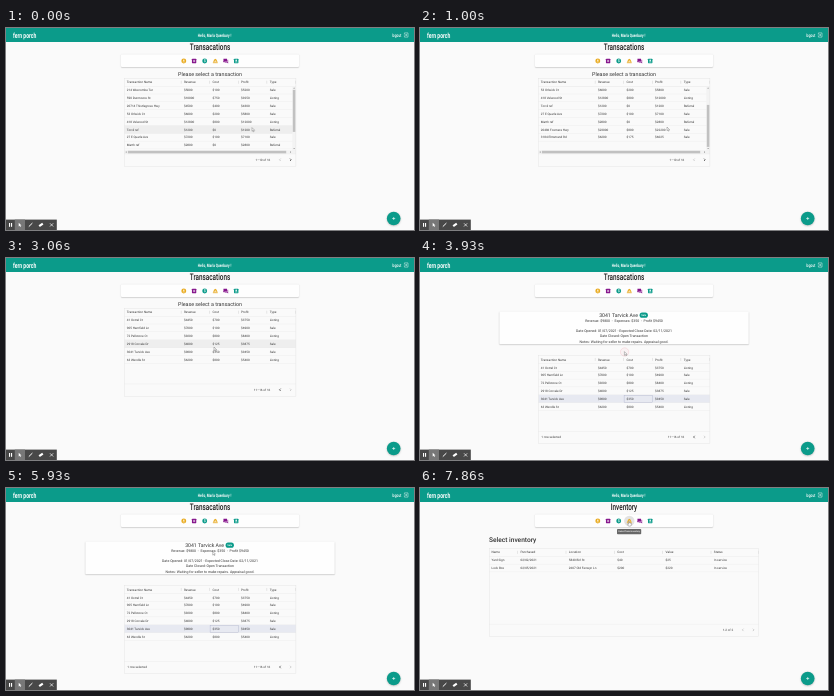
These frames come from a looping animation (408x202 px, 8 s). An HTML page with a canvas:

```html
<!DOCTYPE html>
<html lang="en">
<head>
<meta charset="utf-8">
<title>Transactions dashboard</title>
<style>
html, body { margin: 0; width: 100%; height: 100%; overflow: hidden; background: #fafafa; }
canvas { display: block; width: 408px; height: 202px; }
</style>
</head>
<body>
<canvas id="stage"></canvas>
<script>
const W = 408, H = 202, LOOP = 8000;
const canvas = document.getElementById('stage');
const ctx = canvas.getContext('2d');
const dpr = window.devicePixelRatio || 1;
canvas.width = W * dpr;
canvas.height = H * dpr;

const TEAL = '#0b9b8a', GOLD = '#e8aa20', PURPLE = '#85148b', INK = '#333', LINE = '#e4e4e4';
const ROW = 7.85, HEAD = 8.1, GRID_H = 88;
const SCROLL_MAX = 3 * ROW;

// Moments of the session, in ms
const SCROLL_START = 120, SCROLL_END = 800, LEAVE_ROWS = 1200;
const NEXT_CLICK = 2000, PAGE_TWO = 2070;
const ROW_CLICK = 3530, DETAILS = 3730;
const ICON_CLICK = 6800, INVENTORY = 6950;

// Pointer stops: time, x, y
const path = [
  [0, 246, 99.6], [860, 247, 99], [1200, 247, 99], [1860, 284.6, 130.6],
  [2250, 284.6, 130.6], [2830, 222, 87], [3060, 208, 89], [3260, 204.4, 93.6],
  [5530, 204.4, 93.6], [6330, 209, 33.4], [LOOP, 209, 33.4]
];

const dealCols = {
  heads: ['Transaction Name', 'Revenue', 'Cost', 'Profit', 'Type'],
  edges: [0, 57.2, 85.8, 114.4, 143, 171.6]
};
const stockCols = {
  heads: ['Name', 'Purchased', 'Location', 'Cost', 'Value', 'Status'],
  edges: [0, 28.8, 77.2, 125.6, 174, 222.2, 269.5]
};
const split = text => text.trim().split('\n').map(line => line.trim().split('|'));

const pageOne = split(`
  214 Wexcombe Ter|$5000|$100|$5200|Sale
  590 Dunmoore St|$10000|$750|$9250|Listing
  20714 Thistlegrove Hwy|$4500|$400|$4300|Sale
  53 Orlwick Ct|$6000|$200|$5800|Sale
  418 Velwood St|$12800|$800|$12000|Listing
  Torvil ref|$1200|$0|$1200|Referral
  27 E Quarle Ave|$7200|$100|$7100|Sale
  Marth ref|$2800|$0|$2800|Referral
  20486 Foxmere Hwy|$23000|$800|$22200|Sale
  3184 Elmstrand Rd|$6200|$175|$6025|Sale`);
const pageTwo = split(`
  41 Ostrel Ct|$4450|$700|$3750|Listing
  905 Harnfield Ln|$7000|$100|$6900|Sale
  72 Pellstone Ct|$9200|$800|$8400|Listing
  2918 Corvale Dr|$4000|$125|$3875|Sale
  3041 Tarvick Ave|$9800|$350|$9450|Sale
  63 Wendle St|$6200|$800|$5400|Listing`);
const stock = split(`
  Yard Sign|02/02/2021|5840 Birl St|$40|$25|In service
  Lock Box|02/05/2021|2607 Old Fenwyn Ln|$200|$220|In service`);

const clamp = v => Math.max(0, Math.min(1, v));
const ramp = (t, a, b) => clamp((t - a) / (b - a));
const ease = u => u * u * (3 - 2 * u);

function pointerAt(t) {
  let i = 1;
  while (i < path.length - 1 && t > path[i][0]) i++;
  const [t0, x0, y0] = path[i - 1], [t1, x1, y1] = path[i];
  const u = ease(ramp(t, t0, t1));
  return { x: x0 + (x1 - x0) * u, y: y0 + (y1 - y0) * u };
}

function rect(x, y, w, h, fill) {
  ctx.fillStyle = fill;
  ctx.fillRect(x, y, w, h);
}

function disc(x, y, r, fill) {
  ctx.beginPath();
  ctx.arc(x, y, r, 0, 7);
  ctx.fillStyle = fill;
  ctx.fill();
}

function rounded(x, y, w, h, r, fill) {
  ctx.beginPath();
  ctx.roundRect(x, y, w, h, r);
  ctx.fillStyle = fill;
  ctx.fill();
}

function poly(points, fill) {
  ctx.beginPath();
  points.forEach(([x, y]) => ctx.lineTo(x, y));
  ctx.closePath();
  ctx.fillStyle = fill;
  ctx.fill();
}

function stroke(points, color, width) {
  ctx.beginPath();
  points.forEach(([x, y], i) => i ? ctx.lineTo(x, y) : ctx.moveTo(x, y));
  ctx.strokeStyle = color;
  ctx.lineWidth = width;
  ctx.stroke();
}

// y is the middle of the capitals
function text(str, x, y, size, { color = INK, weight = 400, align = 'left' } = {}) {
  ctx.font = `${weight} ${size}px Roboto, sans-serif`;
  ctx.textAlign = align;
  ctx.fillStyle = color;
  ctx.fillText(str, x, y + size * 0.355);
}

// Narrow display face
function display(str, x, y, size, style) {
  ctx.save();
  ctx.translate(x, y);
  ctx.scale(0.7, 1);
  text(str, 0, 0, size, { weight: 500, ...style });
  ctx.restore();
}

function shadowed(draw, blur, dy, alpha) {
  ctx.save();
  ctx.shadowColor = `rgba(0,0,0,${alpha})`;
  ctx.shadowBlur = blur * dpr;
  ctx.shadowOffsetY = dy * dpr;
  draw();
  ctx.restore();
}

const card = (x, y, w, h) =>
  shadowed(() => rounded(x, y, w, h, 0.8, '#fefefe'), 1.2, 0.5, 0.27);

function header() {
  shadowed(() => rect(0, 0, W, 14, TEAL), 1, 0.2, 0.15);
  display('fern porch', 7, 7.2, 7.2, { color: '#fff', weight: 700 });
  display('Hello, Marla Quenbury !', 208.5, 7, 4.55, { color: '#fff', weight: 700, align: 'center' });
  display('logout', 386, 7, 4.7, { color: '#fff' });
  stroke([[398.4, 6], [398.4, 4.9], [402, 4.9], [402, 9.1], [398.4, 9.1], [398.4, 8]], '#fff', 0.45);
  stroke([[397.8, 7], [400.8, 7]], '#fff', 0.45);
  stroke([[399.8, 6], [400.8, 7], [399.8, 8]], '#fff', 0.45);
}

function person(color) {
  disc(0, -0.7, 0.85, color);
  ctx.beginPath();
  ctx.ellipse(0, 1.4, 1.5, 0.8, 0, Math.PI, 0);
  ctx.fill();
}

// Toolbar icons, each drawn around its own centre
const icons = [
  [177.8, () => {
    disc(0, 0, 2.6, GOLD);
    person('#fff3d0');
  }],
  [188.1, () => {
    rounded(-2.3, -2.3, 4.6, 4.6, 0.5, PURPLE);
    stroke([[-1.2, 0], [1.2, 0]], '#fff', 0.7);
    stroke([[0, -1.2], [0, 1.2]], '#fff', 0.7);
  }],
  [198.7, () => {
    disc(0, 0, 2.6, TEAL);
    text('$', 0, 0, 4, { color: '#fff', weight: 500, align: 'center' });
  }],
  [209.3, () => {
    poly([[-2.5, 0.9], [-1, -1.5], [0, -2.4], [1, -1.5], [2.5, 0.9]], GOLD);
    rect(-2.6, 1.4, 5.2, 0.9, GOLD);
    disc(0, 0.1, 0.65, '#fff');
  }],
  [219.8, () => {
    rect(-2.5, -2.4, 3.8, 3.1, PURPLE);
    poly([[-2.5, 0], [-0.9, 0], [-2.5, 1.7]], PURPLE);
    poly([[1.8, -1.4], [2.5, -1.4], [2.5, 2.6], [1.4, 1.7], [-1.3, 1.7], [-1.3, 1.1], [1.8, 1.1]], PURPLE);
  }],
  [230.2, () => {
    rounded(-2.35, -2.3, 4.7, 4.6, 0.5, TEAL);
    person('#fff');
  }]
];

function toolbar(hover) {
  card(115, 26.2, 178, 12.8);
  if (hover > 0) disc(209.3, 33, 5.2, `rgba(80,80,80,${0.16 * hover})`);
  icons.forEach(([x, draw]) => {
    ctx.save();
    ctx.translate(x, 33);
    ctx.scale(0.94, 0.94);
    draw();
    ctx.restore();
  });
}

function tooltip(alpha) {
  if (!alpha) return;
  ctx.save();
  ctx.globalAlpha = alpha;
  rounded(197, 41, 24.2, 5.2, 0.8, '#676767');
  text('Select from inventory', 209.1, 43.6, 2.25, { color: '#fff', weight: 500, align: 'center' });
  ctx.restore();
}

function chevron(x, y, dir, on) {
  stroke([[x - dir * 0.6, y - 1.2], [x + dir * 0.6, y], [x - dir * 0.6, y + 1.2]], on ? '#222' : '#b8b8b8', 0.65);
}

function scrollbars(x, top, right, bottom, scroll) {
  const bar = 3.6, base = bottom - bar;
  rect(right - bar, top, bar, bottom - top, '#f3f3f3');
  rect(x, base, right - x, bar, '#f3f3f3');
  const travel = 15 * scroll / SCROLL_MAX;
  rect(right - bar + 0.5, top + bar + travel, bar - 1, 42, '#c1c1c1');
  rect(x + bar, base + 0.5, right - x - 3 * bar - 2.5, bar - 1, '#c1c1c1');
  const vx = right - bar / 2, hy = base + bar / 2;
  poly([[vx - 0.8, top + 2.2], [vx + 0.8, top + 2.2], [vx, top + 1.2]], '#777');
  poly([[vx - 0.8, base - 2.2], [vx + 0.8, base - 2.2], [vx, base - 1.2]], '#777');
  poly([[x + 2.2, hy - 0.8], [x + 2.2, hy + 0.8], [x + 1.2, hy]], '#777');
  poly([[right - bar - 2.2, hy - 0.8], [right - bar - 2.2, hy + 0.8], [right - bar - 1.2, hy]], '#777');
}

function grid(x, y, cols, rows, pointer, opt) {
  const { edges, heads } = cols, scroll = opt.scroll || 0;
  const w = edges[edges.length - 1], top = y + HEAD;
  const viewH = opt.bars ? 64.2 : 67.5;
  const inside = pointer.x > x && pointer.x < x + w && pointer.y > top && pointer.y < top + viewH;
  const hover = inside && !opt.still ? Math.floor((pointer.y - top + scroll) / ROW) : -1;

  ctx.save();
  ctx.beginPath();
  ctx.rect(x, top, w, viewH);
  ctx.clip();
  rows.forEach((row, i) => {
    const ry = top + i * ROW - scroll;
    if (i === opt.selected) rect(x, ry, w, ROW, '#e7e9f1');
    else if (i === hover) rect(x, ry, w, ROW, '#eeeeee');
    rect(x, ry + ROW - 0.3, w, 0.3, LINE);
    row.forEach((cell, c) => text(cell, x + edges[c] + 2.4, ry + ROW / 2, 3.08));
    if (i === opt.selected) {
      ctx.strokeStyle = '#a4a9c4';
      ctx.lineWidth = 0.35;
      ctx.strokeRect(x + edges[2], ry + 0.3, edges[3] - edges[2], ROW - 0.6);
    }
  });
  ctx.restore();

  heads.forEach((name, c) => {
    text(name, x + edges[c] + 2.4, y + 4, 3.14);
    rect(x + edges[c + 1] - 0.6, y + 2.5, 0.4, 3, '#c8c8c8');
  });
  rect(x, top - 0.3, w, 0.35, LINE);
  if (opt.bars) scrollbars(x, top, x + w, top + 67.6, scroll);
  rect(x, y + 75.6, w, 0.35, LINE);

  const fy = y + 81.6, right = x + w;
  text(opt.range, right - 25.6, fy, 3.05, { align: 'right' });
  chevron(right - 15.8, fy, -1, opt.prev);
  chevron(right - 5.3, fy, 1, opt.next);
  if (opt.selected >= 0) text('1 row selected', x + 2.9, fy, 3.05);

  ctx.strokeStyle = '#e0e0e0';
  ctx.lineWidth = 0.4;
  ctx.strokeRect(x, y, w, GRID_H);
}

function details() {
  card(79.3, 53.6, 249.5, 32.6);
  text('3041 Tarvick Ave', 218, 57.1, 5.15, { align: 'right' });
  rounded(219.6, 54.6, 8.3, 5.1, 2.55, TEAL);
  text('Sale', 223.75, 57.15, 2.6, { align: 'center', color: '#fff', weight: 500 });
  [
    ['Revenue: $9800  -  Expenses: $350  -  Profit $9450', 63.2],
    ['Date Opened: 01/07/2021 - Expected Close Date: 02/11/2021', 72.7],
    ['Date Closed: Open Transaction', 78.1],
    ['Notes: Waiting for seller to make repairs. Appraisal good.', 83.5]
  ].forEach(([line, y]) => text(line, 204, y, 3.53, { align: 'center' }));
}

function addButton() {
  shadowed(() => disc(387.7, 190.5, 6.85, TEAL), 2, 0.6, 0.25);
  stroke([[386.2, 190.5], [389.2, 190.5]], '#fff', 0.6);
  stroke([[387.7, 189], [387.7, 192]], '#fff', 0.6);
}

function recorder() {
  rect(0, 191.6, 50.8, 10.4, '#484848');
  rect(8.8, 191.6, 10.2, 10.4, '#777');
  const y = 196.9, white = '#fff';
  rect(3, y - 1.9, 1.1, 3.8, white);
  rect(5, y - 1.9, 1.1, 3.8, white);
  poly([[12.7, y - 2.2], [15.5, y + 0.5], [14.2, y + 0.6], [14.8, y + 2], [14.1, y + 2.2], [13.6, y + 0.9], [12.7, y + 1.6]], white);
  stroke([[22.8, y + 1.7], [26.4, y - 1.8]], white, 1);
  stroke([[33.2, y + 1.2], [36.8, y - 1.2]], white, 2.2);
  stroke([[44, y - 1.6], [47.2, y + 1.6]], white, 0.7);
  stroke([[47.2, y - 1.6], [44, y + 1.6]], white, 0.7);
}

function clickRing(t, start, x, y) {
  if (t < start || t > start + 450) return;
  const r = 1.8 + 2.4 * ease(ramp(t, start, start + 130));
  ctx.save();
  ctx.globalAlpha = 1 - ramp(t, start + 200, start + 450);
  disc(x, y, r, 'rgba(240,90,110,0.25)');
  ctx.strokeStyle = '#e8697c';
  ctx.lineWidth = 0.8;
  ctx.stroke();
  ctx.restore();
}

function pointerShape({ x, y }, hand) {
  ctx.save();
  ctx.translate(x, y);
  const arrow = [[0, 0], [0, 3.7], [0.9, 2.9], [1.5, 4.2], [2.1, 3.9], [1.5, 2.7], [2.7, 2.7]];
  const fist = [[-0.4, 0], [0.4, 0], [0.5, 1.5], [2.4, 2], [2.3, 3.4], [1.7, 4.7], [-0.5, 4.7], [-1.6, 2.8], [-1.2, 2.3], [-0.4, 2.9]];
  poly(hand ? fist : arrow, '#fff');
  ctx.strokeStyle = '#444';
  ctx.lineWidth = 0.32;
  ctx.lineJoin = 'round';
  ctx.stroke();
  ctx.restore();
}

function transactions(t, pointer) {
  const open = t >= DETAILS;
  display('Transacations', 204, 19, 9.1, { color: '#1c1c1c', align: 'center' });
  if (open) details();
  else text('Please select a transaction', 204, 46.2, 5.35, { align: 'center' });

  const y = open ? 97.4 : 50.2;
  if (t < PAGE_TWO) {
    const scroll = SCROLL_MAX * ease(ramp(t, SCROLL_START, SCROLL_END));
    // Rows only light up again once the pointer moves after scrolling
    const still = t > SCROLL_START && t < LEAVE_ROWS;
    grid(118.3, y, dealCols, pageOne, pointer, { scroll, still, bars: true, range: '1–10 of 16', next: true });
  } else {
    const selected = t >= ROW_CLICK + 70 ? 4 : -1;
    grid(118.3, y, dealCols, pageTwo, pointer, { selected, range: '11–16 of 16', prev: true });
  }
}

function inventory(pointer) {
  display('Inventory', 204, 19, 9.1, { color: '#1c1c1c', align: 'center' });
  text('Select inventory', 69, 51.4, 6.6, { weight: 500 });
  grid(69.2, 60.3, stockCols, stock, pointer, { range: '1-2 of 2' });
}

function draw(t) {
  const pointer = pointerAt(t);
  ctx.setTransform(dpr, 0, 0, dpr, 0, 0);
  ctx.textRendering = 'geometricPrecision';
  rect(0, 0, W, H, '#fafafa');

  header();
  toolbar(ramp(t, 6250, 6400));
  if (t < INVENTORY) transactions(t, pointer);
  else inventory(pointer);
  tooltip(ramp(t, 6400, 6600));
  addButton();
  recorder();

  clickRing(t, NEXT_CLICK, 285, 131.7);
  clickRing(t, ROW_CLICK, 204.6, 94);
  clickRing(t, ICON_CLICK, 209.2, 34);
  const overNext = t > 1780 && t < 2330;
  pointerShape(pointer, overNext || t > 6250);
}

function tick(now) {
  draw(now % LOOP);
  requestAnimationFrame(tick);
}
draw(0);
requestAnimationFrame(tick);
</script>
</body>
</html>
```
